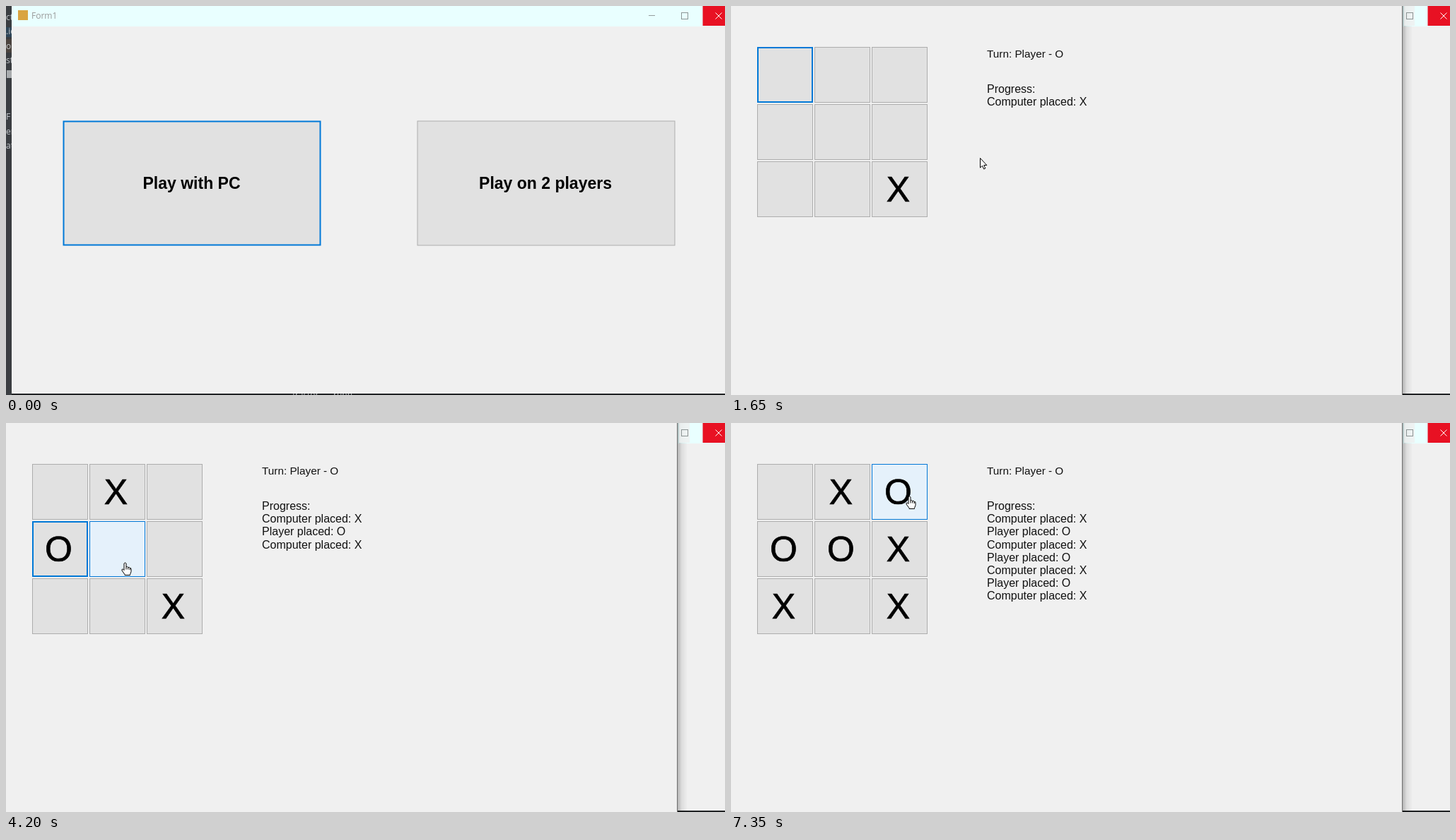
Animation, 1017 px wide and 551 px high, one loop 8000 ms. Source, as an HTML page with a canvas:

```html
<!DOCTYPE html>
<html lang="en">
<head>
<meta charset="utf-8">
<title>Tic-tac-toe</title>
<style>
html, body { margin: 0; width: 100%; height: 100%; overflow: hidden; background: #f0f0f0; }
canvas { display: block; }
</style>
</head>
<body>
<canvas id="stage" width="1017" height="551"></canvas>
<script>
const W = 1017, H = 551, LOOP = 8000;
const OPEN = 660, OPEN_TIME = 240;
const SANS = '"Liberation Sans", Arial, sans-serif';
const UI = '"Open Sans", "Noto Sans", sans-serif';
const BLUE = '#0078d7';

const stage = document.getElementById('stage').getContext('2d');
const layer = document.createElement('canvas');
layer.width = W;
layer.height = H;
const board = layer.getContext('2d');

// Each turn: press time, release time, player's cell, computer's cell
const TURNS = [[3060, 3090, 3, 1], [5280, 5310, 4, 5], [7200, 7350, 2, 6]];

// Pointer path: time, x, y
const PATH = [
  [60, 640, -20], [510, 352, 231], [1380, 352, 231], [1650, 352, 215],
  [1830, 352, 215], [2610, 138, 197], [2850, 88, 190], [3420, 88, 190],
  [3900, 159, 197], [4050, 159, 197], [4590, 206, 196], [4920, 206, 196],
  [5250, 190, 194], [5520, 190, 194], [5820, 225, 193], [6030, 225, 193],
  [6480, 260, 157], [6810, 259, 107], [6930, 252, 103]
];

const ARROW = new Path2D('M0 0V13.5L3 10.8L5.2 15.5L7.3 14.5L5.2 10H9.3Z');
const HAND = new Path2D('M-1.5 11V1.5Q0-1 1.5 1.5V6.5Q3 5 4.2 7Q6 6 6.7 8Q8.5 7.3 8.5 9.5' +
  'V13L7 17V18H-.5V17L-4.5 11.5Q-5 9-3 9.5Z');
const KNUCKLES = new Path2D('M1.5 6.5V10M4.2 7V10M6.7 8V10.5');

function rect(c, color, x, y, w, h) {
  c.fillStyle = color;
  c.fillRect(x, y, w, h);
}

function text(c, str, x, y, font, color, align = 'left') {
  c.font = font;
  c.fillStyle = color;
  c.textAlign = align;
  c.fillText(str, x, y);
}

// Large board mark, slightly heavier than the regular weight
function mark(c, str, x, y) {
  text(c, str, x, y, '50px ' + SANS, '#000', 'center');
  c.strokeStyle = '#000';
  c.lineWidth = .7;
  c.strokeText(str, x, y);
}

function button(c, x, y, w, h, state) {
  const [edge, fill, line] = {
    normal: ['#adadad', '#e1e1e1', 1],
    focus: [BLUE, '#e1e1e1', 2],
    hover: [BLUE, '#e5f1fb', 1],
    press: ['#005499', '#cce4f7', 1]
  }[state];
  rect(c, edge, x, y, w, h);
  rect(c, fill, x + line, y + line, w - 2 * line, h - 2 * line);
}

function pointer(t) {
  const i = PATH.findIndex(k => k[0] > t);
  if (i === 0) return PATH[0].slice(1);
  if (i < 0) return PATH[PATH.length - 1].slice(1);
  const [t0, x0, y0] = PATH[i - 1], [t1, x1, y1] = PATH[i];
  const p = (t - t0) / (t1 - t0), e = p * p * (3 - 2 * p);
  return [Math.round(x0 + (x1 - x0) * e), Math.round(y0 + (y1 - y0) * e)];
}

const cellPos = i => [37 + 81 * (i % 3), 58 + 81 * Math.floor(i / 3)];

function cellAt(x, y) {
  for (let i = 0; i < 9; i++) {
    const [cx, cy] = cellPos(i);
    if (x >= cx && x < cx + 79 && y >= cy && y < cy + 79) return i;
  }
  return -1;
}

function drawEditor(c) {
  rect(c, '#3a3d41', 0, 0, 8, H);
  rect(c, '#2f4658', 0, 30, 8, 14);
  rect(c, '#4b443f', 0, 47, 8, 19);
  rect(c, '#a9acae', 1, 91, 7, 11);
  [['ct', 20], ['.ic', 40], ['o', 61], ['st', 81], ['F', 161], ['er', 182], ['at', 202]]
    .forEach(([s, y]) => text(c, s, 0, y, '12px ' + UI, '#c3c7ca'));
}

function maximizeIcon(c) {
  c.strokeStyle = '#8c9494';
  c.lineWidth = 1;
  c.strokeRect(955.5, 9.5, 9, 9);
}

function drawMenu(c, t) {
  drawEditor(c);
  rect(c, '#f0f0f0', 8, 0, W - 8, H);
  rect(c, '#e9ffff', 8, 0, W - 8, 29);
  rect(c, '#d9a441', 17, 6, 14, 14);
  text(c, 'Form1', 36, 18, '12px ' + UI, '#999');
  rect(c, '#949c9c', 909, 13, 9, 1);
  maximizeIcon(c);
  rect(c, '#e81123', 985.5, 0, 31.5, 28);
  c.strokeStyle = '#fff';
  c.beginPath();
  c.moveTo(1003.5, 9.5); c.lineTo(1012.5, 18.5);
  c.moveTo(1012.5, 9.5); c.lineTo(1003.5, 18.5);
  c.stroke();

  const [x, y] = pointer(t);
  const over = t < OPEN && x < 445 && y > 163;
  button(c, 80.5, 162.5, 365, 177, !over ? 'focus' : t < 570 ? 'hover' : 'press');
  button(c, 581.5, 162.5, 365, 177, 'normal');
  const font = 'bold 23px ' + SANS;
  text(c, 'Play with PC', 262.5, 259, font, '#000', 'center');
  text(c, 'Play on 2 players', 763, 259, font, '#000', 'center');

  rect(c, '#202224', 8, 549, W - 8, 2);
  c.save();
  c.beginPath();
  c.rect(400, 549, 100, 2);
  c.clip();
  text(c, 'fractor', 405, 555, '12px ' + UI, '#b8bcc0');
  text(c, 'runn', 463, 555, '12px ' + UI, '#b8bcc0');
  c.restore();
}

function drawBoard(c, t) {
  c.clearRect(0, 0, W, H);
  const shade = c.createLinearGradient(950, 0, 964, 0);
  shade.addColorStop(0, 'rgba(0,0,0,.25)');
  shade.addColorStop(.4, 'rgba(0,0,0,.08)');
  shade.addColorStop(1, 'rgba(0,0,0,0)');
  rect(c, shade, 950, 0, 14, H);
  rect(c, '#f0f0f0', 0, 0, 949, H);
  rect(c, '#707070', 949, 0, 1, H);

  const marks = { 8: 'X' }, log = ['Progress:', 'Computer placed: X'];
  let focus = 0, pressed = -1;
  for (const [down, up, mine, theirs] of TURNS) {
    if (t < down) break;
    focus = mine;
    if (t < up) {
      pressed = mine;
    } else {
      marks[mine] = 'O';
      marks[theirs] = 'X';
      log.push('Player placed: O', 'Computer placed: X');
    }
  }

  const hovered = cellAt(...pointer(t));
  for (let i = 0; i < 9; i++) {
    const [x, y] = cellPos(i);
    const state = i === pressed ? 'press' : i === hovered && t > 1000 ? 'hover' :
      i === focus ? 'focus' : 'normal';
    button(c, x, y, 79, 79, state);
    if (marks[i]) mark(c, marks[i], x + 37.5, y + 57);
  }

  text(c, 'Turn: Player - O', 362, 72.5, '15.3px ' + SANS, '#111');
  log.forEach((s, i) => text(c, s, 362, 123 + 18.2 * i, '16px ' + SANS, '#111'));
}

function drawPointer(c, t) {
  if (t < 60) return;
  const [x, y] = pointer(t);
  const hand = t > 1000 && cellAt(x, y) >= 0;
  c.save();
  c.translate(x + .5, y + .5);
  c.fillStyle = '#fff';
  c.strokeStyle = '#000';
  c.lineWidth = 1;
  c.fill(hand ? HAND : ARROW);
  c.stroke(hand ? HAND : ARROW);
  if (hand) c.stroke(KNUCKLES);
  c.restore();
}

function draw(t) {
  drawMenu(stage, t);
  const p = Math.min(1, Math.max(0, (t - OPEN) / OPEN_TIME));
  if (p > 0) {
    drawBoard(board, t);
    const k = 1 - .1 * Math.pow(1 - p, 1.56);
    stage.save();
    stage.globalAlpha = p;
    // The window extends past the left and bottom edges, so keep those covered
    stage.translate(342 * (1 - k), 225 * (1 - k));
    stage.scale(k, k);
    rect(stage, '#f0f0f0', -60, -60, 60, H + 120);
    rect(stage, '#f0f0f0', 0, -60, 949, 60);
    rect(stage, '#f0f0f0', 0, H, 949, 60);
    stage.drawImage(layer, 0, 0);
    stage.restore();
    if (p === 1) {
      rect(stage, 'rgba(240,240,240,.8)', 952, 0, 15, 28);
      maximizeIcon(stage);
    }
  }
  drawPointer(stage, t);
}

const start = performance.now();
function tick() {
  const t = (performance.now() - start) % LOOP;
  draw(Math.floor(t / 30) * 30);
  requestAnimationFrame(tick);
}
tick();
</script>
</body>
</html>
```
